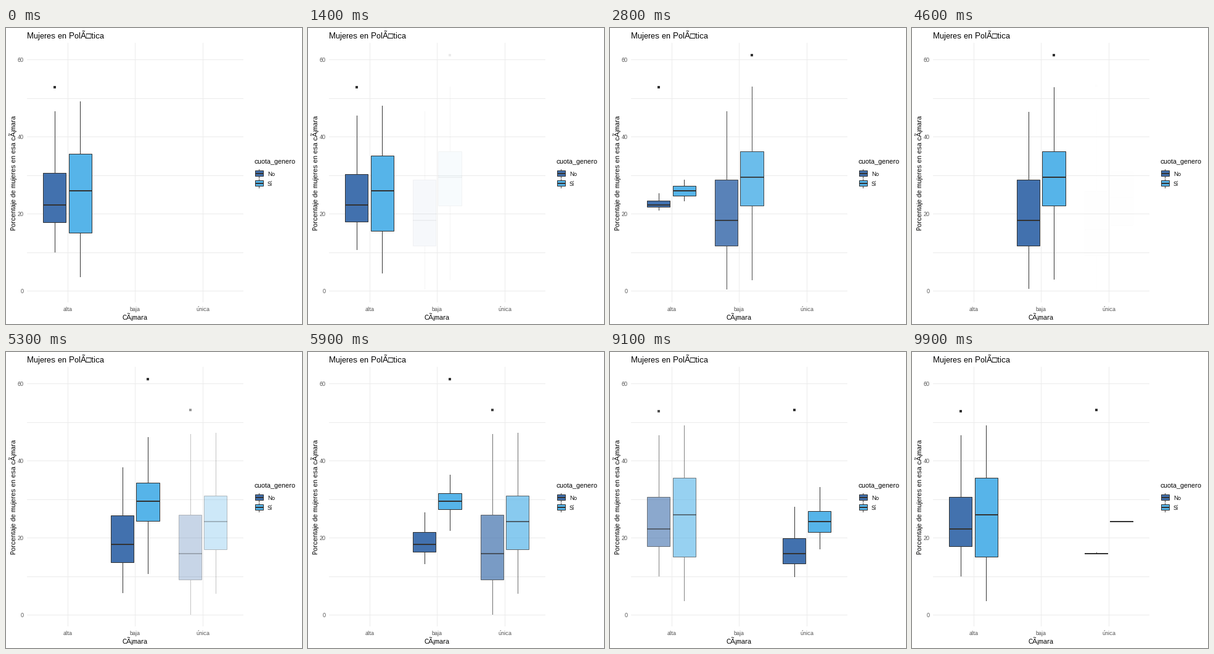
These frames come from a looping animation (480 by 480 pixels, 10000 ms). A matplotlib script:

```python
import math

import matplotlib.pyplot as plt
from matplotlib.animation import FuncAnimation
from matplotlib.patches import Circle, Rectangle

SIZE, DPI = 480, 100
PX = 72 / DPI
INK, GRID, GREY = "#333333", "#EBEBEB", "#4D4D4D"
NO, YES = "#4271AE", "#56B4E9"

# Per box, in pixels: left, right, whisker x, high, q3, median, q1, low, outlier
GROUPS = [
    [(60, 97, 79, 135, 235, 287, 315, 364, 96),
     (102, 139, 120, 119, 204, 264, 332, 404, None)],
    [(170, 207, 189, 135, 246, 312, 353, 424, None),
     (211, 249, 230, 95, 200, 242, 288, 409, 44)],
    [(280, 317, 299, 133, 264, 327, 369, 426, 94),
     (321, 358, 340, 131, 233, 275, 320, 392, None)],
]
# First frame and number of steps of each change of state
MOVES = [(12, 22), (46, 22), (80, 21)]
FRAMES, INTERVAL = 100, 100

plt.rcParams.update({"font.family": "Liberation Sans",
                     "text.hinting": "native", "text.hinting_factor": 1})
fig = plt.figure(figsize=(SIZE / DPI, SIZE / DPI), dpi=DPI, facecolor="white")
ax = fig.add_axes([0, 0, 1, 1])
ax.set_xlim(0, SIZE)
ax.set_ylim(SIZE, 0)
ax.axis("off")


def bar(x, y, w, h, color, alpha=1, z=3):
    return ax.add_patch(Rectangle((x, y), w, h, fc=color, ec="none", lw=0,
                                  alpha=alpha, zorder=z))


def label(x, y, text, size, color="black", **kw):
    kw.setdefault("va", "baseline")
    ax.text(x, y, text, fontsize=size * PX, color=color, **kw)


def box(x0, x1, xm, high, q3, med, q1, low, fill, alpha=1):
    return [
        bar(xm, high, 1, q3 - high, INK, alpha),
        bar(xm, q1 + 1, 1, max(low - q1 - 1, 0), INK, alpha),
        ax.add_patch(Rectangle((x0 + .5, q3 + .5), x1 - x0, q1 - q3, fc=fill,
                               ec=INK, lw=PX, alpha=alpha, zorder=4,
                               snap=False)),
        bar(x0, med - 1, x1 - x0 + 1, 2, INK, alpha, 5),
    ]


def draw_group(group, alpha, scale):
    parts = []
    for (x0, x1, xm, high, q3, med, q1, low, out), fill in zip(group, (NO, YES)):
        mid = med - .5
        high, q3, q1, low = (round(mid + (y - mid) * scale)
                             for y in (high, q3, q1, low))
        if out is not None:
            parts.append(ax.add_patch(Circle((xm, out), 1.5, fc=INK, ec=INK,
                                             lw=PX, alpha=alpha, zorder=3,
                                             antialiased=False)))
        parts += box(x0, x1, xm, high, q3, med, q1, low, fill, alpha)
    return parts


def draw_static():
    for value in range(0, 70, 10):
        y = int(426.5 - 6.25 * value)
        bar(34, y, 351, 1, GRID, z=1)
        if value % 20 == 0:
            label(29, y + 4, str(value), 9, GREY, ha="right")
    for x, name in zip((100, 209, 319), ("alta", "baja", "única")):
        bar(x, 24, 1, 421, GRID, z=1)
        label(x, 459, name, 9, GREY, ha="center")

    label(34, 17, "Mujeres en PolÃ\u25a1tica", 13)
    label(209, 473, "CÃ¡mara", 11, ha="center")
    label(18, 235, "Porcentaje de mujeres en esa cÃ¡mara", 11, rotation=90,
          ha="right", va="center")

    label(402, 220, "cuota_genero", 11)
    for y, name, fill in ((236, "No", NO), (252, "Sí", YES)):
        box(404, 417, 410, y - 7, y - 5, y, y + 4, y + 8, fill)
        label(424, y + 4, name, 9)


def visible(frame):
    """Return (group, alpha, scale) for everything shown in this frame."""
    current = 0
    for n, (start, steps) in enumerate(MOVES):
        k = frame - start + 1
        if k < 1:
            break
        following = (n + 1) % 3
        if k < steps:
            t = (1 - math.cos(math.pi * k / steps)) / 2
            return [(n, 1, 1 - t), (following, t, 1)]
        current = following
    return [(current, 1, 1)]


live = []


def update(frame):
    while live:
        live.pop().remove()
    for n, alpha, scale in visible(frame):
        live.extend(draw_group(GROUPS[n], alpha, scale))
    return live


draw_static()
anim = FuncAnimation(fig, update, frames=FRAMES, interval=INTERVAL,
                     init_func=lambda: update(0), repeat=True, repeat_delay=0)
plt.show()
```
